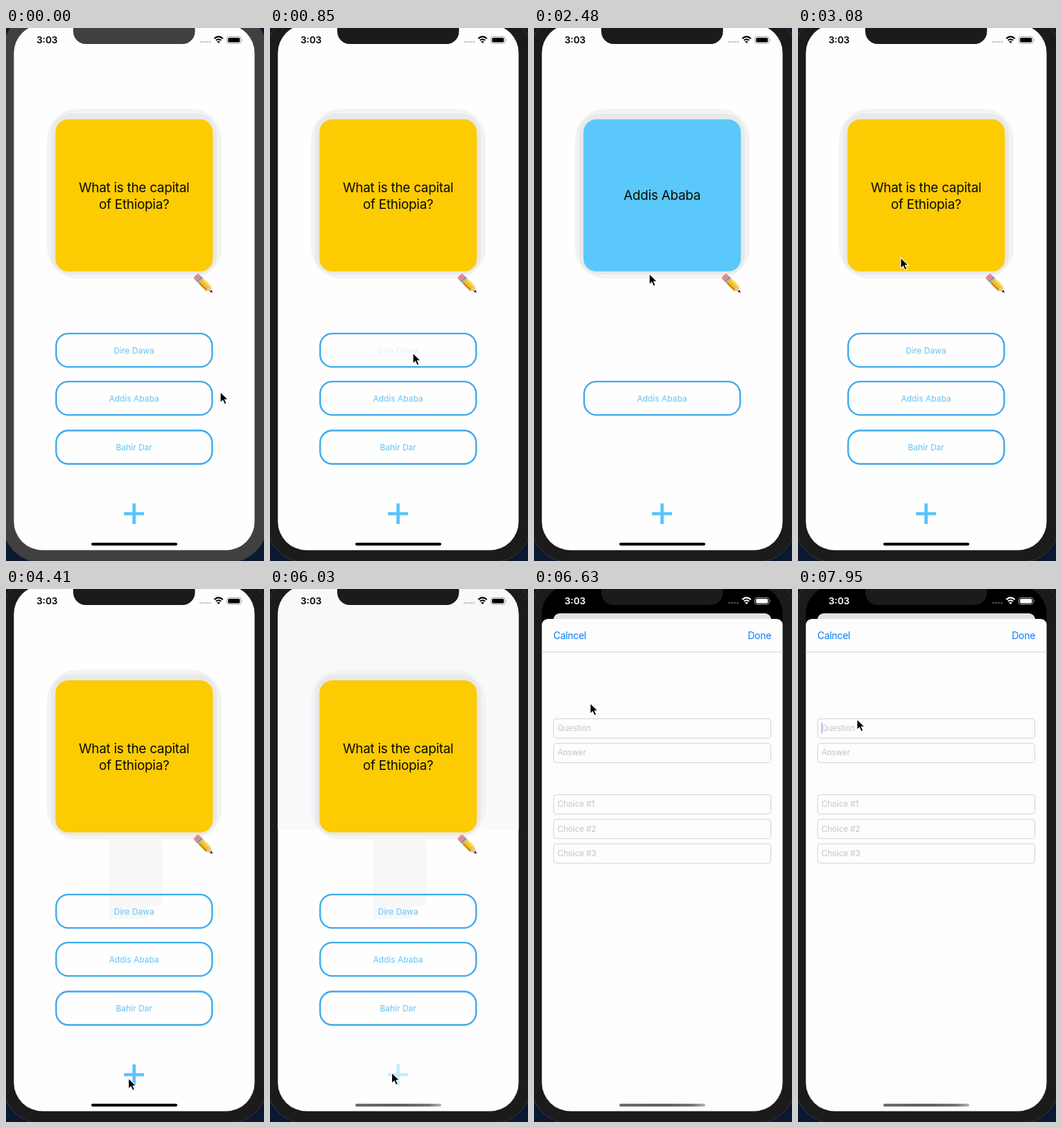
An HTML page that plays this animation: 372 px wide and 766 px high, repeating every 8000 ms.

```html
<!DOCTYPE html>
<html lang="en">
<head>
<meta charset="utf-8">
<title>Flashcards</title>
<style>
  html, body { margin: 0; width: 100%; height: 100%; overflow: hidden; background: #0a1830; }
  svg { display: block; width: 372px; height: 766px; font-family: Inter, "Liberation Sans", sans-serif; }
  .mid { text-anchor: middle; }
  .choice rect { fill: none; stroke: #40aaf0; stroke-width: 2.4; }
  .choice text { font-size: 12px; fill: #62c4f8; }
  .card text { font-size: 18.9px; letter-spacing: -.27px; fill: #0a0a05; }
  .nav { font-size: 14px; letter-spacing: -.3px; fill: #0a7cf5; }
  .field rect { fill: #fdfdfd; stroke: #d2d2d2; }
  .field text { font-size: 11.5px; fill: #c4c4c6; }
</style>
</head>
<body>
<svg viewBox="0 0 372 766">
  <defs>
    <clipPath id="glass"><rect x="11.300" y="-5" width="347.200" height="755.400" rx="41"/></clipPath>
    <linearGradient id="worn">
      <stop offset="0" stop-color="#686868"/>
      <stop offset=".5" stop-color="#585858"/>
      <stop offset=".85" stop-color="#707070"/>
      <stop offset="1" stop-color="#b4b4b4"/>
    </linearGradient>
  </defs>

  <rect width="372" height="766" fill="#0a1830"/>
  <rect id="bezel" x="-5" y="-22" width="382" height="790" rx="56" stroke="#383838"/>

  <g clip-path="url(#glass)">
    <rect x="11" y="-5" width="348" height="756" fill="#000"/>
    <g id="home">
      <rect x="11" y="-5" width="348" height="756" rx="10" fill="#fefefe"/>
      <rect id="tint" x="11" y="-5" width="348" height="351" fill="#f8f9fb"/>
      <path id="smudge" d="M148 340H225V455H204V474H148Z" fill="#f7f7f7"/>
      <rect x="59" y="116" width="252" height="244" rx="44" fill="#f3f3f3"/>
      <rect x="65" y="123" width="239" height="231" rx="28" fill="#e9e9e9"/>
      <g class="card mid">
        <rect id="face" x="71.300" y="131.300" width="227" height="218.500" rx="18.500"/>
        <g id="front"><text x="184.700" y="236">What is the capital</text><text x="184.700" y="260">of Ethiopia?</text></g>
        <text id="back" x="184.700" y="247">Addis Ababa</text>
      </g>
      <g transform="translate(274 356.500) rotate(45)">
        <path d="M2-5H6V5H2Q-1 5-1 2V-2Q-1-5 2-5Z" fill="#e8878d"/>
        <path d="M5-5H10V5H5Z" fill="#a9aeb3"/>
        <path d="M7-5V5" stroke="#70777d"/>
        <path d="M10-5H25V5H10Z" fill="#f3c02a"/>
        <path d="M10-5H25V-2H10Z" fill="#fbd75a"/>
        <path d="M10 2H25V5H10Z" fill="#cf911d"/>
        <path d="M25-5L33 0L25 5Z" fill="#e9c397"/>
        <path d="M30-2L34 0L30 2Z" fill="#333"/>
      </g>
      <g id="choices"></g>
      <path id="plus" d="M170 695.700H182.300V683.200H187V695.700H199V700.300H187V713H182.300V700.300H170Z" fill="#5ac4f8"/>
      <rect id="dim" x="11" y="-5" width="348" height="756" rx="10"/>
    </g>
    <g id="sheet">
      <rect x="11" y="43" width="348" height="760" rx="9" fill="#fdfdfd"/>
      <text class="nav" x="28" y="72">Calncel</text>
      <text class="nav" x="342" y="72" text-anchor="end">Done</text>
      <path d="M11 90.500H359" stroke="#d6d6d6"/>
      <g id="fields"></g>
      <rect id="caret" x="33.500" y="192" width="1.700" height="16" fill="#5468f0"/>
    </g>
  </g>

  <path id="notch" d="M93-6Q97-4 97 2V5A18 18 0 0 0 115 23H254.500A18 18 0 0 0 272.500 5V2Q272.500-4 276.500-6Z"/>
  <g id="status" fill="currentColor">
    <text x="44" y="22" font-size="13.5" font-weight="600">3:03</text>
    <path id="dots" d="M279.500 20H295" stroke-width="2.500" stroke-dasharray="3 1.200"/>
    <g fill="none" stroke="currentColor" stroke-width="2">
      <path d="M300.300 15.200Q306.500 9.500 312.700 15.200"/>
      <path d="M302.800 17.800Q306.500 14.600 310.200 17.800"/>
    </g>
    <path d="M304.300 19.500Q306.500 17.800 308.700 19.500L306.500 22Z"/>
    <rect x="318.500" y="12.500" width="20.500" height="9.500" rx="2.800" fill="none" stroke="#a0a0a0"/>
    <rect x="320.200" y="14" width="17" height="6.500" rx="1.500"/>
    <path d="M340.300 15.500Q342 17.200 340.300 19Z" fill="#a0a0a0"/>
  </g>
  <rect id="bar" x="123" y="739.700" width="124" height="4" rx="2"/>
  <path id="cursor" d="M0 0V15.500L3.600 12.200L6.200 17.800L8.900 16.600L6.500 11.100H11.400Z" stroke="#fff" stroke-width="1.100"/>
</svg>

<script>
// The screen is refreshed in steps; all times below are step counts.
const LOOP = 8000, STEP = 147.9, LEAD = 44, LAST = 54;
const $ = id => document.getElementById(id);

// Places where the pointer rests; bow bends the way there sideways.
const STOPS = [
  { x: 309, y: 523, from: 0, to: 0 },
  { x: 206, y: 467, from: 5, to: 7 },
  { x: 190, y: 606, from: 10, to: 12 },
  { x: 188.5, y: 539, from: 14, to: 15 },
  { x: 148, y: 330, from: 18, to: 22, bow: 40 },
  { x: 176.5, y: 703, from: 29, to: 30, bow: 45 },
  { x: 274, y: 552, from: 34, to: 35 },
  { x: 175.5, y: 695, from: 39, to: 42 },
  { x: 81, y: 164, from: 45, to: 46 },
  { x: 67, y: 211, from: 48, to: 49 },
  { x: 85, y: 187, from: 53, to: LAST }
];

const CHOICES = [
  { label: "Dire Dawa", y: 439.1, press: 6 },
  { label: "Addis Ababa", y: 508.1, press: 14, right: true },
  { label: "Bahir Dar", y: 578.5, press: 11 }
];
const FIELDS = ["Question", "Answer", "Choice #1", "Choice #2", "Choice #3"];
const FLIP = 15, RESET = 21, OPEN = 41, TYPE = 51;

$("choices").innerHTML = CHOICES.map(({ label, y }) =>
  `<g class="choice mid"><rect x="72.3" y="${y}" width="225" height="48" rx="17.5"/>
   <text x="184.6" y="${y + 28.7}">${label}</text></g>`).join("");
$("fields").innerHTML = FIELDS.map((label, i) => {
  const y = 186.5 + 35.3 * i + (i > 1 ? 38.5 : 0);
  return `<g class="field"><rect x="28.3" y="${y}" width="313.2" height="27.8" rx="4"/>
   <text x="34" y="${y + 17.6}">${label}</text></g>`;
}).join("");
const buttons = [...$("choices").children];

const clamp = u => Math.min(1, Math.max(0, u));
const easeOut = (u, power) => 1 - (1 - clamp(u)) ** power;
const show = (el, on) => el.setAttribute("visibility", on ? "visible" : "hidden");
const set = (id, name, value) => $(id).setAttribute(name, value);

function pointer(k) {
  const i = STOPS.findIndex(s => k <= s.to);
  const b = STOPS[i], a = STOPS[i - 1] ?? b;
  const e = k >= b.from ? 1 : easeOut((k - a.to) / (b.from - a.to), 2);
  const bend = (b.bow ?? 0) * Math.sin(Math.PI * e);
  return [a.x + (b.x - a.x) * e + bend, a.y + (b.y - a.y) * e];
}

function draw(k) {
  const shell = k < 5 ? "#404040" : "#1b1b1b";
  set("bezel", "fill", shell);
  set("notch", "fill", shell);

  const flipped = k >= FLIP && k < RESET;
  set("face", "fill", flipped ? "#5ac8fa" : "#fdcb02");
  show($("front"), !flipped);
  show($("back"), flipped);
  CHOICES.forEach(({ press, right }, i) => {
    show(buttons[i], right || k <= press || k >= RESET);
    buttons[i].lastElementChild.setAttribute("opacity", k === press ? .2 : 1);
  });

  show($("smudge"), k > 22);
  show($("tint"), k === OPEN);
  set("plus", "opacity", k === OPEN || k === OPEN - 1 ? .35 : 1);

  const rise = easeOut((k - OPEN) / 4, 3);
  const s = 1 - rise * 34 / 348;
  set("home", "transform", `translate(${185 * (1 - s)} ${-5 + 40 * rise + 5 * s}) scale(${s})`);
  set("dim", "opacity", .11 * rise);
  set("sheet", "transform", `translate(0 ${708 * (1 - rise)})`);
  show($("sheet"), rise > 0);
  set("caret", "opacity", k < TYPE ? 0 : k < LAST ? 1 : .45);

  set("status", "color", rise ? "#fff" : "#000");
  set("dots", "stroke", rise ? "#484848" : "#c8c8c8");
  set("bar", "fill", k < OPEN ? "#000" : "url(#worn)");
  set("cursor", "transform", `translate(${pointer(k).join(" ")})`);
}

const start = performance.now();
let last = -1;
function tick() {
  const t = (performance.now() - start) % LOOP;
  const k = Math.min(LAST, Math.floor((t + LEAD) / STEP));
  if (k !== last) draw(last = k);
  requestAnimationFrame(tick);
}
tick();
</script>
</body>
</html>
```
